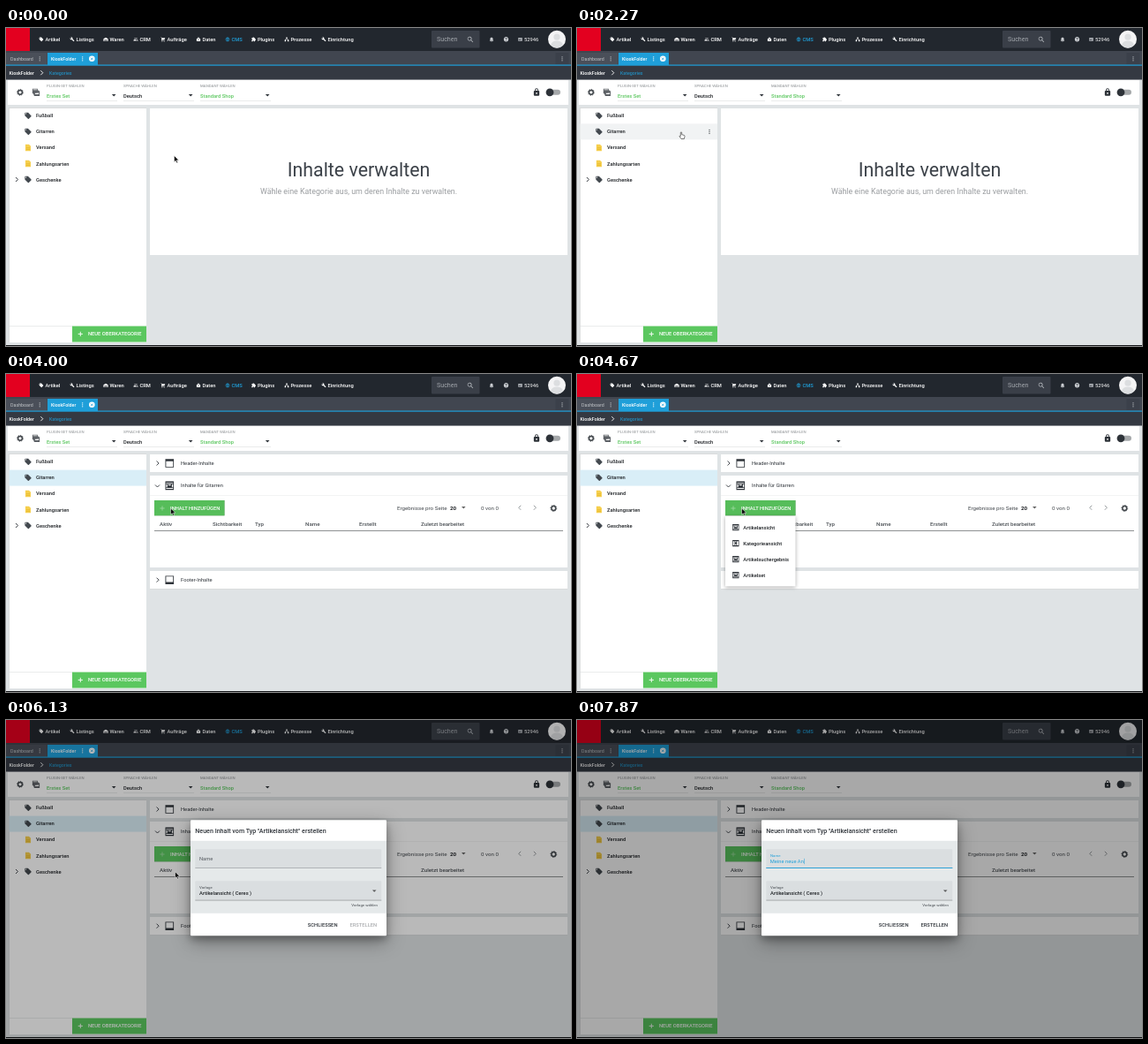
An HTML page for the animation above (8 s loop, 640x360 px).

```html
<!DOCTYPE html>
<html lang="de">
<head>
<meta charset="utf-8">
<style>
  html, body { margin: 0; width: 100%; height: 100%; overflow: hidden; background: #dfe3e5; }
  svg { display: block; width: 640px; height: 360px; }
  text { font-family: Roboto, sans-serif; white-space: pre; }
  .card { filter: drop-shadow(0 .6px .6px rgba(0, 0, 0, .38)); }
  .float { filter: drop-shadow(0 1.5px 2px rgba(0, 0, 0, .35)); }
  .modal { filter: drop-shadow(0 4px 4px rgba(0, 0, 0, .25)) drop-shadow(0 6px 10px rgba(0, 0, 0, .35)); }
</style>
</head>
<body>
<svg id="stage" viewBox="0 0 640 360"></svg>
<script>
const BLUE = '#1f9fd9', GREEN = '#5bc75f', DARK = '#2e3339', INK = '#1d2024', GREY = '#8c9093';
const S = 5.78, SMALL = 4.35, TAB = 5.33, LARGE = 6.22;

const PATHS = {
  tag: 'M2 4q0-2 2-2h7l1.4.6 9 9q1.2 1.4 0 2.800l-7 7q-1.400 1.200-2.800 0l-9-9-.6-1.400zM5.500 4a1.500 1.500 0 1 0 .01 0z',
  house: 'M12 3 1 10v11h22V10zM6 21v-8h12v8zM8 15h8v2H8zM8 18h8v2H8z',
  people: 'M8 11a3 3 0 1 0 0-6 3 3 0 0 0 0 6zM16 11a3 3 0 1 0 0-6 3 3 0 0 0 0 6zM1 19v-2q0-4 7-4t7 4v2zM17 19v-2q0-2-1-3.500 7 0 7 3.500v2z',
  cart: 'M1 2h3l1 3h17l-4 9H8l-1 2h12v2H5q-2-1-1-3l1-2L3 4H1zM7 19a2 2 0 1 0 .01 0zM17 19a2 2 0 1 0 .01 0z',
  box: 'M3 9h18v12H3zM7 3h10v4H7zM9 12h6v3H9z',
  globe: 'M12 2a10 10 0 1 0 .01 0zM12 4a8 8 0 1 1-.01 0zM4 11h16v2H4zM12 3q-9 9 0 18 9-9 0-18zM12 6q5 6 0 12-5-6 0-12z',
  puzzle: 'M20.500 11H19V7q0-2-2-2h-4V3.500a2.500 2.500 0 0 0-5 0V5H4Q2 5 2 7v4h1.500a2.700 2.700 0 0 1 0 5.400H2V20q0 2 2 2h4v-1.500a2.700 2.700 0 0 1 5.400 0V22H17q2 0 2-2v-4h1.500a2.500 2.500 0 0 0 0-5z',
  nodes: 'M9 2h6v7H9zM2 15h6v7H2zM16 15h6v7h-6zM11 9h2v3h7v3h-2v-1H6v1H4v-3h7z',
  wrench: 'M22.700 19 13.600 9.900C15 6 12 0 5 2l4 4-3 3-4-4C0 12 6 15 9.900 13.600l9.100 9.100z',
  bell: 'M12 22q2 0 2-2h-4q0 2 2 2zM18 16v-5q0-5-4.500-6.300a1.500 1.500 0 0 0-3 0Q6 6 6 11v5l-2 2v1h16v-1z',
  search: 'M15.500 14h-.8a6.500 6.500 0 1 0-.7.700v.8l5 5 1.500-1.500zM9.500 14a4.500 4.500 0 1 1 .01 0z',
  lock: 'M18 8h-1V6A5 5 0 0 0 7 6v2H6q-2 0-2 2v10q0 2 2 2h12q2 0 2-2V10q0-2-2-2zM9 8V6a3 3 0 0 1 6 0v2zM12 13a2 2 0 1 0 .01 0z',
  page: 'M3 1h12l6 6v16H3z',
  header: 'M1 1h22v22H1zM3 7v14h18V7z',
  footer: 'M1 1h22v22H1zM3 3v14h18V3z',
  gallery: 'M1 1h22v22H1zM3 4v2h18V4zM3 18v2h18v-2zM3 8v8h3V8zM8 8v4l3-2 2 3 3-4V8zM18 8v8h3V8z',
  category: 'M1 1h22v22H1zM3 5v14h5V5zM10 5v4h4V5zM10 15v4h4v-4zM16 5v14h5V5z',
  layers: 'M1 1h16v4h2v3h4v15H6v-4H4v-3H1zM3 3v2h12V3zM8 18l4-5 3 3 3-4 3 6z',
  help: 'M12 2a10 10 0 1 0 .01 0zM11 17h2v2h-2zM8 9q0-4 4-4t4 4q0 2-3 4v2h-2v-3q3-1.500 3-3 0-2-2-2t-2 2z',
  card: 'M2 4h20v16H2zM5 8v2h14V8zM5 13v2h9v-2z'
};

const rect = (x, y, w, h, fill, extra = '') =>
  `<rect x="${x}" y="${y}" width="${w}" height="${h}" fill="${fill}" ${extra}/>`;
const text = (x, cy, str, fill = DARK, size = S, weight = 400, extra = '') =>
  `<text x="${x}" y="${cy + size * .355}" fill="${fill}" font-size="${size}" font-weight="${weight}" ${extra}>${str}</text>`;
const icon = (name, cx, cy, size, fill = DARK) =>
  `<path d="${PATHS[name]}" fill="${fill}" fill-rule="evenodd" transform="translate(${cx - size / 2} ${cy - size / 2}) scale(${size / 24})"/>`;
const line = (d, color, width = .9) => `<path d="${d}" fill="none" stroke="${color}" stroke-width="${width}"/>`;
const chevron = (x, y, color = DARK, dir = 1) => line(`M${x - 1.2 * dir} ${y - 2.5}l${2.5 * dir} 2.500l${-2.5 * dir} 2.500`, color);
const down = (x, y, fill = DARK) => `<path d="M${x - 2.3} ${y - 1.1}h4.600l-2.300 2.300z" fill="${fill}"/>`;
const plus = (x, y, extra = '') => `<path d="M${x - 2.6} ${y}h5.200M${x} ${y - 2.6}v5.200" stroke="#fff" stroke-width=".9" ${extra}/>`;
const dots = (x, y, fill) => [-2, 0, 2].map(d => `<circle cx="${x}" cy="${y + d}" r=".65" fill="${fill}"/>`).join('');
const gear = (x, y) => `<g fill="none" stroke="#41464b"><circle cx="${x}" cy="${y}" r="2.400" stroke-width="1.500"/>
  <circle cx="${x}" cy="${y}" r="3.400" stroke-width="1" pathLength="16" stroke-dasharray="1"/></g>`;
const group = (id, body, extra = '') => `<g id="${id}" ${extra}>${body}</g>`;

const NAV = [['tag', 40, 'Artikel'], ['wrench', 75, 'Listings'], ['house', 113, 'Waren'], ['people', 147, 'CRM'],
  ['cart', 178, 'Aufträge'], ['box', 218, 'Daten'], ['globe', 251, 'CMS'], ['puzzle', 280.5, 'Plugins'],
  ['nodes', 318, 'Prozesse'], ['wrench', 360, 'Einrichtung']];
const ROWS = [['tag', 'Fußball'], ['tag', 'Gitarren'], ['page', 'Versand'], ['page', 'Zahlungsarten'], ['tag', 'Geschenke']];
const MENU = [['gallery', 'Artikelansicht'], ['category', 'Kategorieansicht'], ['gallery', 'Artikelsuchergebnis'], ['gallery', 'Artikelset']];
const COLUMNS = [[174, 'Aktiv'], [234, 'Sichtbarkeit'], [282, 'Typ'], [339, 'Name'], [400, 'Erstellt'], [470, 'Zuletzt bearbeitet']];
const rowY = i => 99.3 + 18.05 * i;

const topBars = () => rect(0, 0, 640, 26, '#22272e') + rect(0, 0, 27, 26, '#e3001f')
  + NAV.map(([name, x, label]) => {
    const color = label === 'CMS' ? BLUE : '#fff';
    return icon(name, x, 12.8, 5.6, color) + text(x + 4.4, 12.8, label, color, S, 500);
  }).join('')
  + rect(482, 3, 54.5, 19.5, '#3a3f48', 'rx="1"') + text(488, 12.8, 'Suchen', '#a3a7ad', 7.11)
  + icon('search', 526, 13, 9, '#b6babf') + icon('bell', 550, 12.8, 6.5, '#c9ccd0') + icon('help', 566.5, 12.8, 6.5, '#c9ccd0')
  + icon('card', 582.5, 12.8, 5.5, '#aeb2b8') + text(587, 12.8, '52946', '#fff')
  + `<circle cx="624" cy="12.700" r="10" fill="#f4f4f5"/><circle cx="624" cy="10.200" r="3.600" fill="#dcdee0"/>
     <path d="M617 19.500q1-5 7-5t7 5q-7 6-14 0z" fill="#dcdee0"/>`
  + rect(0, 26, 640, 16, '#414650') + rect(0, 28, 46.5, 14, '#4a4f59') + text(5, 34.8, 'Dashboard', '#c3c6ca', TAB) + dots(38.2, 34.8, '#c3c6ca')
  + rect(47, 28, 57, 14, BLUE) + text(51, 34.8, 'KioskFolder', '#fff', TAB, 500) + dots(86.7, 34.8, '#fff')
  + `<circle cx="97.300" cy="34.800" r="3.300" fill="#fff"/>` + line('M96 33.500l2.600 2.600m0-2.600l-2.600 2.600', BLUE, .8)
  + rect(622.5, 28, 15, 13, '#3b404a') + dots(630, 34.8, '#c3c6ca')
  + rect(0, 42, 640, 16.5, '#343942') + rect(0, 41.5, 640, 1.2, BLUE)
  + text(3.5, 50.7, 'KioskFolder', '#fff', TAB, 500) + chevron(40.5, 50.7, '#fff') + text(49, 50.7, 'Kategories', BLUE, TAB);

const select = (x, label, value, color) => text(x, 65.6, label, GREY, SMALL) + text(x, 76.7, value, color, S, 500)
  + down(x + 76.2, 76.2) + rect(x, 82, 80, .4, '#c9cccd');

const toolbar = () => rect(2, 59, 635, 28, '#fff', 'class="card"') + gear(16, 72.8)
  + icon('layers', 34, 72.8, 9, '#5d6166')
  + select(46, 'PLUGIN-SET WÄHLEN', 'Erstes Set', GREEN) + select(133, 'SPRACHE WÄHLEN', 'Deutsch', INK)
  + select(220, 'MANDANT WÄHLEN', 'Standard Shop', GREEN)
  + icon('lock', 601, 72.7, 9.5) + rect(613, 69.8, 15, 6, '#a5a8aa', 'rx="3"') + `<circle cx="616" cy="72.800" r="4.400" fill="${DARK}"/>`;

const sidebar = () => rect(3.5, 90.5, 155.5, 265.5, '#fff', 'class="card"') + rect(3.5, 108.6, 155.5, 18, '#fff', 'id="hover"')
  + rect(3.5, 108.6, 155.5, 18, '#d9eef7', 'id="selected"')
  + ROWS.map(([name, label], i) => icon(name, 25, rowY(i), name === 'page' ? 8.2 : 8.8, name === 'page' ? '#f6cf4e' : '#43494f')
    + (name === 'page' ? line(`M23 ${rowY(i) + .3}h4m-4 1.700h4`, '#d9a91f', .5) : '') + text(34, rowY(i), label, INK, S, 500)).join('')
  + chevron(12.2, rowY(4)) + group('rowDots', dots(150, 0, DARK))
  + rect(3.5, 337.5, 72, .5, '#d5d8d9') + rect(75, 337.5, 84, 18, GREEN) + plus(84.3, 346.4) + text(93, 346.4, 'NEUE OBERKATEGORIE', '#fff', S, 500);

const welcome = () => rect(163, 91, 473, 166, '#fff', 'class="card"')
  + text(399.5, 160.4, 'Inhalte verwalten', '#3b4148', 21.33, 400, 'text-anchor="middle"')
  + text(399.5, 185.3, 'Wähle eine Kategorie aus, um deren Inhalte zu verwalten.', '#9a9da0', 8.85, 400, 'text-anchor="middle"');

const panelHead = (y, name, label) => icon(name, 185.3, y, 10.5) + text(198, y, label);
const panels = () => rect(163, 91, 473, 20, '#fff', 'class="card"') + chevron(171.8, 101) + panelHead(101, 'header', 'Header-Inhalte')
  + rect(163, 115, 473, 104, '#fff', 'class="card"') + line('M169 125.500l2.500 2.500 2.500-2.500', DARK) + panelHead(126.4, 'gallery', 'Inhalte für Gitarren')
  + rect(163, 137.2, 473, .4, '#e1e3e4')
  + rect(163, 223, 473, 20.5, '#fff', 'class="card"') + chevron(171.8, 233.2) + panelHead(233.2, 'footer', 'Footer-Inhalte')
  + rect(168, 143, 79.5, 17.3, GREEN, 'class="card"') + rect(168, 143, 79.5, 17.3, '#000', 'id="buttonHover" opacity=".05"')
  + `<clipPath id="buttonClip">${rect(168, 143, 79.5, 17.3, '#000')}</clipPath>
     <g clip-path="url(#buttonClip)"><circle id="ripple" cx="187" cy="152" fill="#fff"/></g>`
  + plus(177, 152, 'opacity=".4"') + text(186, 152, 'INHALT HINZUFÜGEN', '#fff', S, 500)
  + text(443, 151.4, 'Ergebnisse pro Seite', '#43484d', LARGE) + text(503, 151.4, '20', INK, LARGE, 700) + down(518.3, 151.2, '#666')
  + text(538, 151.4, '0 von 0', '#43484d', LARGE) + chevron(582, 151.3, GREY, -1) + chevron(599, 151.3, GREY) + gear(620.3, 152)
  + COLUMNS.map(([x, label]) => text(x, 170, label, '#4d5257', LARGE, 500)).join('') + rect(168, 177, 463, 1, '#8e9192');

const menu = () => rect(168, 160.8, 79.5, 79.6, '#fff', 'class="float"') + rect(168, 164.5, 79.5, 18, '#000', 'id="itemHover" opacity=".11"')
  + MENU.map(([name, label], i) => icon(name, 179.8, 173.6 + 18 * i, 8) + text(188.3, 173.6 + 18 * i, label, INK, S, 500)).join('');

const dialog = () => rect(209, 113.3, 222, 131, '#fff', 'rx="1" class="modal"') + rect(209, 136.8, 222, 82, '#e5e9ea')
  + text(214.3, 125.2, 'Neuen Inhalt vom Typ "Artikelansicht" erstellen', DARK, 7.11, 500)
  + rect(214.3, 146.3, 211, 21.7, '#dadee0', 'rx="1"') + rect(214.3, 167.5, 211, .5, '#85898c') + rect(214.3, 167.1, 211, .9, BLUE, 'id="focusLine"')
  + `<text id="nameLabel" x="219">Name</text>` + text(218.8, 159.8, '', BLUE, S, 400, 'id="typed"') + rect(0, 156.8, .5, 6.4, BLUE, 'id="caret"')
  + rect(214.3, 182.3, 211, 21.9, '#dadee0', 'rx="1"') + rect(214.3, 203.8, 211, .5, '#6d7174')
  + text(219, 189, 'Vorlage', '#43484d', SMALL) + text(219, 196.2, 'Artikelansicht ( Ceres )', INK, S, 500) + down(417.2, 193.6, '#555')
  + text(421, 209.2, 'Vorlage wählen', '#43484d', SMALL, 400, 'text-anchor="end"')
  + text(341.8, 231.8, 'SCHLIESSEN', DARK, S, 500) + text(389.5, 231.8, 'ERSTELLEN', DARK, S, 500, 'id="create"');

const stage = document.getElementById('stage');
stage.innerHTML = rect(0, 0, 640, 360, '#dfe3e5') + topBars() + toolbar() + sidebar()
  + group('welcome', welcome()) + group('panels', panels()) + group('menu', menu())
  + rect(0, 359, 640, 1, '#15171a') + rect(0, 0, 640, 360, '#000', 'id="shade"') + group('dialog', dialog())
  + group('pointer',
    `<path id="arrow" d="M0 0v7.200l1.700-1.500 1.200 2.600 1.200-.5-1.200-2.600h2.300z" fill="#000" stroke="#fff" stroke-width=".5"/>
     <path id="hand" d="M-.7.400q.7-.8 1.400 0v2.500l2.700.7q.8.300.6 1.200l-.6 2.900H.1L-2 4.900q0-1 1.300-.2z" fill="#fff" stroke="#222" stroke-width=".6"/>`);

const ui = Object.fromEntries([...stage.querySelectorAll('[id]')].map(el => [el.id, el]));
const show = (el, on) => el.style.display = on ? '' : 'none';
const set = (el, attrs) => { for (const key in attrs) el.setAttribute(key, attrs[key]); };
const progress = (t, start, length) => Math.min(1, Math.max(0, (t - start) / length));
const easeOut = p => 1 - (1 - p) ** 3;
const easeInOut = p => p * p * (3 - 2 * p);
const scaled = (x, y, s) => `translate(${x} ${y}) scale(${s}) translate(${-x} ${-y})`;

// Pointer moves: start, end, x, y
const MOVES = [[530, 1330, 143, 118.4], [1390, 1870, 117.4, 117.6], [2160, 2270, 118, 117.8],
  [3050, 3930, 186.6, 152], [5100, 5600, 191.5, 171.8]];
const TYPED = 'Meine neue An';
const KEYS = [6730, 6870, 6930, 7000, 7070, 7270, 7270, 7330, 7470, 7530, 7600, 7730, 7870];

function pointerAt(t) {
  let x = 190.5, y = 144.5;
  for (const [start, end, toX, toY] of MOVES) {
    const p = easeInOut(progress(t, start, end - start));
    x += (toX - x) * p;
    y += (toY - y) * p;
  }
  return [x, y];
}

function render(t) {
  const [x, y] = pointerAt(t);
  const opened = t >= 2600;
  const inSidebar = x < 159;
  const hovered = Math.floor((y - 90.5) / 18.05);
  set(ui.pointer, { transform: `translate(${x} ${y})` });
  show(ui.pointer, t < KEYS[0]);
  show(ui.hand, inSidebar);
  show(ui.arrow, !inSidebar);

  show(ui.hover, inSidebar);
  set(ui.hover, { y: rowY(hovered) - 9, fill: '#f1f3f4' });
  show(ui.rowDots, inSidebar);
  set(ui.rowDots, { transform: `translate(0 ${rowY(hovered)})` });
  show(ui.selected, t >= 2470);
  show(ui.welcome, !opened);
  show(ui.panels, opened);

  show(ui.buttonHover, t >= 4000 && t < 5250);
  const ripple = progress(t, 4250, 420);
  set(ui.ripple, { r: 65 * easeOut(ripple), opacity: .2 * (1 - ripple) });

  const menuIn = easeOut(progress(t, 4330, 140));
  show(ui.menu, menuIn > 0 && t < 6090);
  set(ui.menu, { transform: scaled(168, 161, .8 + .2 * menuIn), opacity: menuIn * (1 - progress(t, 6010, 80)) });
  show(ui.itemHover, y > 164.5);

  set(ui.shade, { opacity: .34 * easeOut(progress(t, 5983, 350)) });
  const dialogIn = easeOut(progress(t, 5981, 150));
  set(ui.dialog, { transform: scaled(320, 178.7, .7 + .3 * dialogIn), opacity: dialogIn });

  const focus = easeOut(progress(t, 6150, 400));
  set(ui.nameLabel, { y: 158.7 - 4.2 * focus, 'font-size': S + (SMALL - S) * focus, fill: focus > 0 ? BLUE : '#54595e' });
  set(ui.focusLine, { opacity: focus, transform: `translate(${320 * (1 - focus) / 2} 0) scale(${(1 + focus) / 2} 1)` });
  const count = KEYS.filter(key => t >= key).length;
  ui.typed.textContent = TYPED.slice(0, count);
  set(ui.caret, { x: 219 + ui.typed.getComputedTextLength() });
  show(ui.caret, t >= 6600);
  set(ui.create, { opacity: count ? 1 : .4 });
}

function frame() {
  render(performance.now() % 8000);
  requestAnimationFrame(frame);
}
frame();
</script>
</body>
</html>
```
